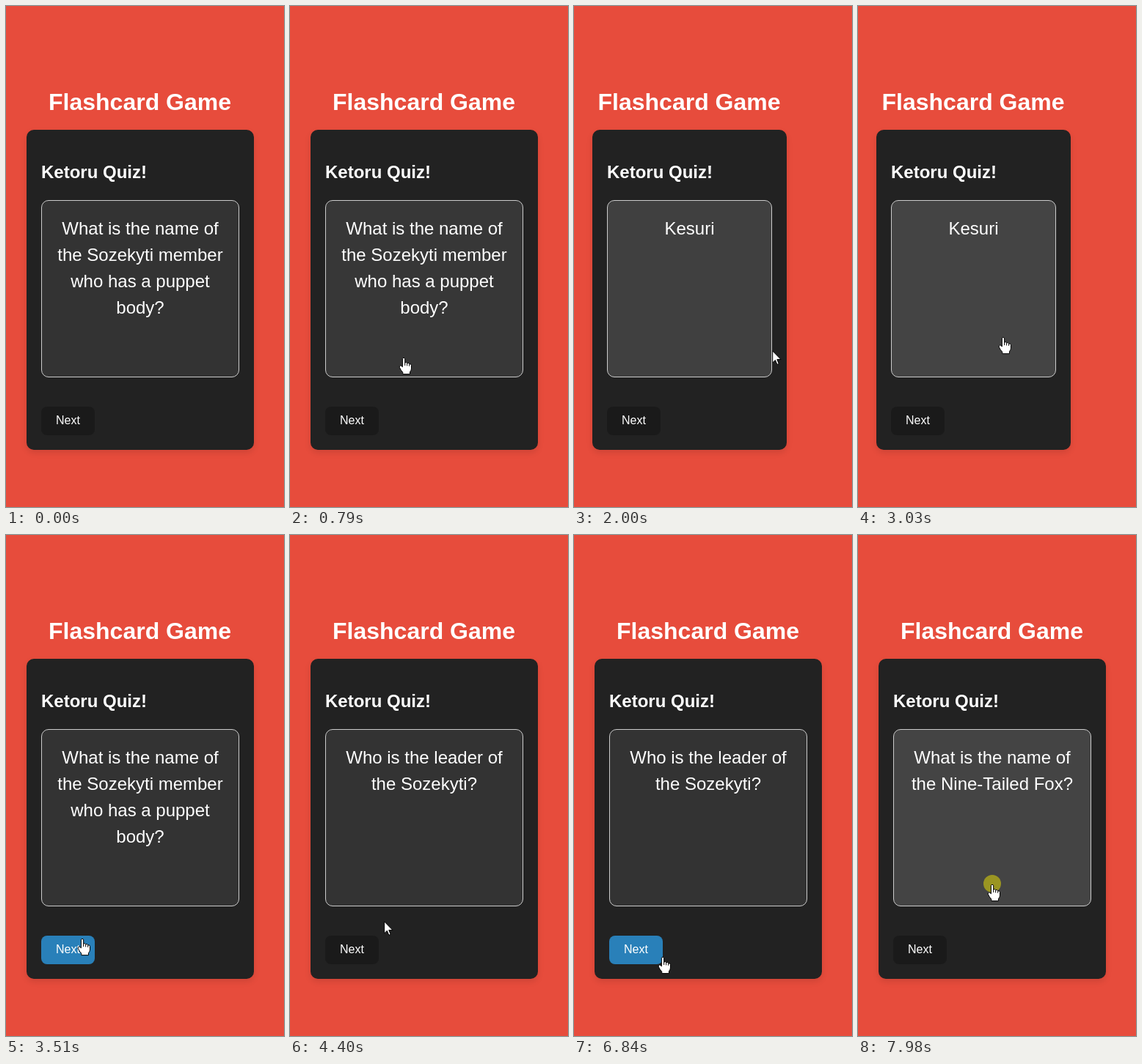
Animation, 379 px wide and 684 px high, one loop 8 s. Source, as an HTML page with a canvas:

```html
<!DOCTYPE html>
<html lang="en">
<head>
<meta charset="utf-8">
<title>Flashcard Game</title>
<style>
  html, body { margin: 0; width: 100%; height: 100%; overflow: hidden; background: #e74c3c; }
  body { position: relative; color: #fff; font-family: Arial, "Liberation Sans", sans-serif; }
  body * { position: absolute; box-sizing: border-box; margin: 0; white-space: pre; }
  h1 { top: 113px; width: 310px; font-size: 32px; line-height: 36px; text-align: center; }
  #panel { top: 169px; height: 437px; border-radius: 10px; background: #222; box-shadow: 0 4px 8px rgba(0, 0, 0, .1); }
  h2 { left: 20px; top: 40px; font-size: 24px; line-height: 36px; }
  #card { left: 20px; top: 96px; height: 242px; border: 1px solid #ccc; border-radius: 10px; }
  #text { left: 0; top: 20px; width: 100%; font-size: 24px; line-height: 36px; text-align: center; }
  #next { left: 20px; top: 378px; width: 73px; height: 39px; border-radius: 8px; font-size: 16px; line-height: 38px; text-align: center; }
  canvas { left: 0; top: 0; }
</style>
</head>
<body>
<h1 id="title">Flashcard Game</h1>
<div id="panel">
  <h2>Ketoru Quiz!</h2>
  <div id="card"><div id="text"></div></div>
  <div id="next">Next</div>
</div>
<canvas id="layer" width="379" height="684"></canvas>
<script>
const LOOP = 8000, FADE = 200, PRESS = 70, STEP = 10;
const el = id => document.getElementById(id);
const title = el('title'), panel = el('panel'), card = el('card'), text = el('text'), next = el('next');
const ctx = el('layer').getContext('2d');

const puppet = 'What is the name of\nthe Sozekyti member\nwho has a puppet\nbody?';
const leader = 'Who is the leader of\nthe Sozekyti?';
const short = 'Kesuri';
const sides = [puppet, short, puppet, leader, 'Soot (Hodeta\nRemoshi)', leader,
  'What is the name of\nthe Nine-Tailed Fox?'];

// each click turns to the next side on release
const releases = [1940, 3230, 4130, 4890, 6440, 7250, 8040];

// pointer moves: start, end, target, upward bow
const entry = { x: 252, y: 637 };
const moves = [
  { from: 440, to: 790, x: 155, y: 480, bow: 0 },
  { from: 790, to: 1060, x: 156, y: 472, bow: 0 },
  { from: 1260, to: 1600, x: 271, y: 471, bow: 48 },
  { from: 2000, to: 2210, x: 212, y: 460, bow: 0 },
  { from: 2410, to: 3160, x: 195, y: 466, bow: 25 },
  { from: 3190, to: 3480, x: 104, y: 551, bow: 0 },
  { from: 3510, to: 3860, x: 98, y: 562, bow: 0 },
  { from: 4130, to: 4820, x: 176, y: 475, bow: 0 },
  { from: 6440, to: 6840, x: 121, y: 576, bow: 0 },
  { from: 6840, to: 7110, x: 108, y: 568, bow: 0 },
  { from: 7250, to: 7710, x: 183, y: 477, bow: 0 }
];

const clamp = v => Math.max(0, Math.min(1, v));
const smooth = p => p * p * (3 - 2 * p);
const within = (p, l, t, r, b) => p.x >= l && p.x <= r && p.y >= t && p.y <= b;

function pointer(t) {
  if (t < moves[0].from) return null;
  let pos = entry;
  for (const m of moves) {
    if (t < m.from) break;
    const p = clamp((t - m.from) / (m.to - m.from));
    pos = {
      x: pos.x + (m.x - pos.x) * p,
      y: pos.y + (m.y - pos.y) * p - m.bow * Math.sin(Math.PI * p)
    };
  }
  return pos;
}

function state(t) {
  const side = sides[releases.filter(r => r <= t).length];
  const narrow = side === short;
  const left = narrow ? 25 : 28, width = narrow ? 265 : 310;
  const pos = pointer(t);
  return {
    side, left, width, pos,
    onCard: pos && within(pos, left + 20, 265, left + width - 20, 507),
    onNext: pos && within(pos, left + 20, 547, left + 94, 586),
    pressed: releases.some(r => t >= r - PRESS && t < r)
  };
}

// card brightness over the loop, rising while hovered and falling otherwise
const glow = [];
for (let t = 0, g = 0; t <= LOOP; t += STEP) {
  glow.push(smooth(g));
  g = clamp(g + (state(t).onCard ? STEP : -STEP) / FADE);
}

const arrow = new Path2D('M0 0V16L3.7 12.5L6.2 18.5L8.6 17.5L6.1 11.6H11.3Z');
const hand = new Path2D('M-1.6 12.8V1.6Q-1.6 .4 0 .4Q1.7 .4 1.7 1.8V7Q4.4 5.9 4.7 7.7Q7.3 6.9 7.7 8.8' +
  'Q10.5 8.3 10.5 10.6V15Q10.5 17.5 8.5 19.6V22.6H-1.2V20.2Q-4 17.5 -5.6 13.6Q-6.2 11.5 -4.6 11Q-3.2 10.8 -1.6 12.8Z');
const creases = new Path2D('M1.7 7V11M4.7 7.7V11.4M7.7 8.8V11.8');

function drawPointer({ pos, onCard, onNext, pressed }) {
  ctx.save();
  ctx.translate(pos.x, pos.y);
  if (pressed) {
    ctx.fillStyle = 'rgba(240,230,0,.5)';
    ctx.beginPath();
    ctx.arc(0, -1, 12, 0, 2 * Math.PI);
    ctx.fill();
  }
  const linked = onCard || onNext, shape = linked ? hand : arrow;
  ctx.lineJoin = 'round';
  ctx.fillStyle = '#fff';
  ctx.fill(shape);
  ctx.stroke(shape);
  if (linked) ctx.stroke(creases);
  ctx.restore();
}

function draw(t) {
  const s = state(t);
  if (text.textContent !== s.side) text.textContent = s.side;
  panel.style.left = s.left + 'px';
  panel.style.width = s.width + 'px';
  card.style.width = s.width - 40 + 'px';
  title.style.left = s.left + s.width / 2 - 155.5 + 'px';

  const g = Math.round(51 + 17 * glow[Math.floor(t / STEP)]);
  card.style.background = `rgb(${g},${g},${g})`;
  next.style.background = s.onNext ? '#2980b9' : '#1a1a1a';

  ctx.clearRect(0, 0, 379, 684);
  if (s.pos) drawPointer(s);
}

function tick() {
  draw(performance.now() % LOOP);
  requestAnimationFrame(tick);
}
tick();
</script>
</body>
</html>
```
